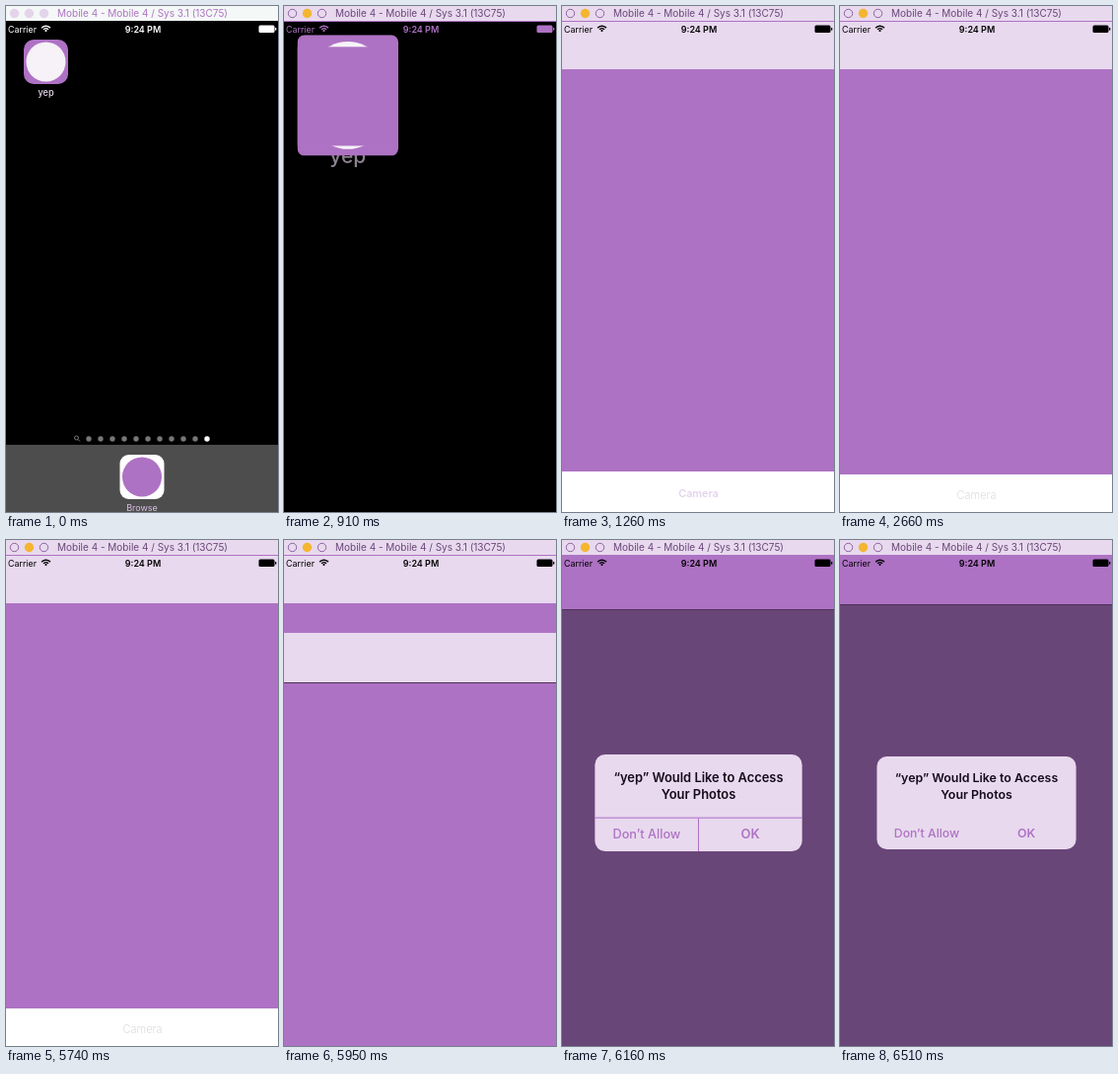
Animation, 276 px wide and 512 px high, one loop 8000 ms. Source, as an HTML page with a canvas:

```html
<!DOCTYPE html>
<html lang="en">
<head>
<meta charset="utf-8">
<title>Photo access prompt</title>
<style>
html, body { margin: 0; width: 276px; height: 512px; overflow: hidden; background: #000; }
canvas { display: block; }
</style>
</head>
<body>
<canvas id="stage" width="276" height="512"></canvas>
<script>
const ctx = document.getElementById('stage').getContext('2d');
const LOOP = 8000, STEP = 70;
const PURPLE = '#ae72c4', LILAC = '#e8d9ee', DARK = '#694678', INK = '#000';

const clamp = v => Math.max(0, Math.min(1, v));
const mix = (a, b, p) => a + (b - a) * p;
const smooth = u => u * u * (3 - 2 * u);
// Critically damped spring from 0 to 1, ms since its start
const spring = (ms, k) => ms <= 0 ? 0 : 1 - (1 + ms * k) * Math.exp(-ms * k);

function rect(x, y, w, h, color) {
  ctx.fillStyle = color;
  ctx.fillRect(x, y, w, h);
}

function rounded(x, y, w, h, r, color) {
  ctx.beginPath();
  ctx.roundRect(x, y, w, h, r);
  ctx.fillStyle = color;
  ctx.fill();
}

function circle(x, y, r, fill, stroke) {
  ctx.beginPath();
  ctx.arc(x, y, r, 0, 7);
  if (fill) { ctx.fillStyle = fill; ctx.fill(); }
  if (stroke) { ctx.strokeStyle = stroke; ctx.stroke(); }
}

function text(str, x, y, size, color, weight = 400, align = 'center') {
  ctx.font = `${weight} ${size}px Inter, Roboto, sans-serif`;
  ctx.textAlign = align;
  ctx.fillStyle = color;
  ctx.fillText(str, x, y);
}

function layer(alpha, draw) {
  ctx.save();
  ctx.globalAlpha = alpha;
  draw();
  ctx.restore();
}

function titleBar(active) {
  rect(0, 0, 276, 15, active ? LILAC : '#f4f8f6');
  if (active) rect(0, 15, 276, 1, PURPLE);
  ctx.lineWidth = 1;
  for (const x of [8.5, 23.5, 38.5]) {
    if (!active) circle(x, 7.5, 4.7, '#e4d4ea');
    else if (x === 23.5) circle(x, 7.5, 4.7, '#f4b62f');
    else circle(x, 7.5, 4.2, null, '#8f64a1');
  }
  text('Mobile 4 - Mobile 4 / Sys 3.1 (13C75)', 52, 11, 10, active ? DARK : PURPLE, 400, 'left');
}

function statusBar(color) {
  text('Carrier', 2, 26.5, 8.9, color, 400, 'left');
  text('9:24 PM', 139, 26.5, 9, color, 600);
  ctx.strokeStyle = color;
  ctx.lineWidth = 1.4;
  for (const r of [3.2, 5.8]) {
    ctx.beginPath();
    ctx.arc(40.5, 26, r, -Math.PI * .77, -Math.PI * .23);
    ctx.stroke();
  }
  circle(40.5, 25, 1.1, color);
  rounded(256.5, 19.5, 16, 7.5, 1.5, color);
  rect(273, 22, 1.3, 2.6, color);
}

// App tile in its own 45 x 45 box
function tile() {
  rect(0, 0, 45, 45, PURPLE);
  circle(22.5, 22.5, 20, '#f6f2f8');
}

function home() {
  text('yep', 40.5, 91, 9.2, LILAC, 500);
  ctx.lineWidth = 1;
  circle(71.5, 437, 2, null, '#777');
  ctx.beginPath();
  ctx.moveTo(73, 438.5);
  ctx.lineTo(75, 440.5);
  ctx.stroke();
  for (let i = 0; i < 11; i++) circle(84 + i * 12, 438, 2.7, i < 10 ? '#777' : '#fff');
  rect(0, 444, 276, 68, '#4d4d4d');
  rounded(115.5, 454, 45, 45, 9, '#fff');
  circle(138, 476.5, 20, PURPLE);
  text('Browse', 138, 511, 9, '#d9bfe3');
}

// App screen in a 276 x 497 box; bars are the header and the footer
function app(t, body, bars) {
  const settled = t >= 1470, foot = settled ? 459 : 456;
  layer(body, () => rect(0, 49, 276, foot - 49, PURPLE));
  layer(bars, () => {
    rect(0, 0, 276, 49, LILAC);
    rect(0, foot, 276, 497 - foot, '#fff');
    const y = settled ? 484 : 482;
    if (t < 2660) text('Camera', 138.5, y, 10.8, '#e4d3eb', 600);
    else text('Camera', 138.5, y, 11, '#dcdcdc', 300);
  });
}

function launch(t) {
  const p = t < 840 ? 0 : smooth(clamp((t - 770) / 430));
  const x = mix(18, 0, p), y = mix(34, 15, p);
  const w = mix(45, 276, p), h = mix(45, 497, p ** 1.27);
  if (p < 1) {
    ctx.save();
    ctx.globalAlpha = clamp(1 - 1.6 * p);
    ctx.translate(x, y);
    ctx.scale(w / 45, w / 45);
    ctx.translate(-18, -34);
    home();
    ctx.restore();
  }
  ctx.save();
  ctx.beginPath();
  ctx.roundRect(x, y, w, h, mix(10, 0, p));
  ctx.clip();
  ctx.translate(x, y);
  ctx.save();
  ctx.scale(w / 45, h / 45);
  tile();
  ctx.restore();
  if (t >= 700 && t < 840) layer(.4, () => rect(0, 0, 45, 45, '#000'));
  ctx.scale(w / 276, h / 497);
  app(t, clamp((t - 770) / 140), clamp((t - 910) / 280));
  ctx.restore();
}

function picker(t, p) {
  const top = mix(512, 15, spring(t - 5740, .0157));
  const head = p > .3 ? PURPLE : LILAC;
  rect(0, 15, 276, 49, head);
  rect(0, top, 276, 50, head);
  rect(0, top + 50, 276, 512, p > .7 ? DARK : PURPLE);
  rect(0, Math.round(top) + 50, 276, 1, '#4b3156');
  if (p > .3 && p < .7) layer(.25, () => text('Camera', 137, 499, 10.8, LILAC, 300));
}

function alertBox(p) {
  const s = mix(1.2, 1, p), ink = p < .75 ? DARK : '#160a1c';
  ctx.save();
  ctx.globalAlpha = clamp(p * 2);
  ctx.translate(138.5, 266);
  ctx.scale(s, s);
  rounded(-101, -47, 202, 94, 10, LILAC);
  if (p < .95) {
    rect(-101, 14, 202, 1, PURPLE);
    rect(-.5, 15, 1, 32, PURPLE);
  }
  text('“yep” Would Like to Access', 0, -20.5, 12.4, ink, 600);
  text('Your Photos', 0, -3.5, 12.4, ink, 600);
  text('Don’t Allow', -50.5, 35, 12.2, PURPLE, 500);
  text('OK', 50.5, 35, 12.4, PURPLE, 600);
  ctx.restore();
}

function draw(now) {
  const t = Math.floor(now % LOOP / STEP) * STEP;
  const p = spring(t - 5953, .0143);
  rect(0, 0, 276, 512, '#000');
  launch(t);
  if (t > 5740) picker(t, p);
  if (p > 0) alertBox(p);
  titleBar(t >= 700);
  statusBar(t < 840 ? '#fff' : t < 1120 ? PURPLE : INK);
}

const start = performance.now();
function tick() {
  draw(performance.now() - start);
  requestAnimationFrame(tick);
}
tick();
</script>
</body>
</html>
```
